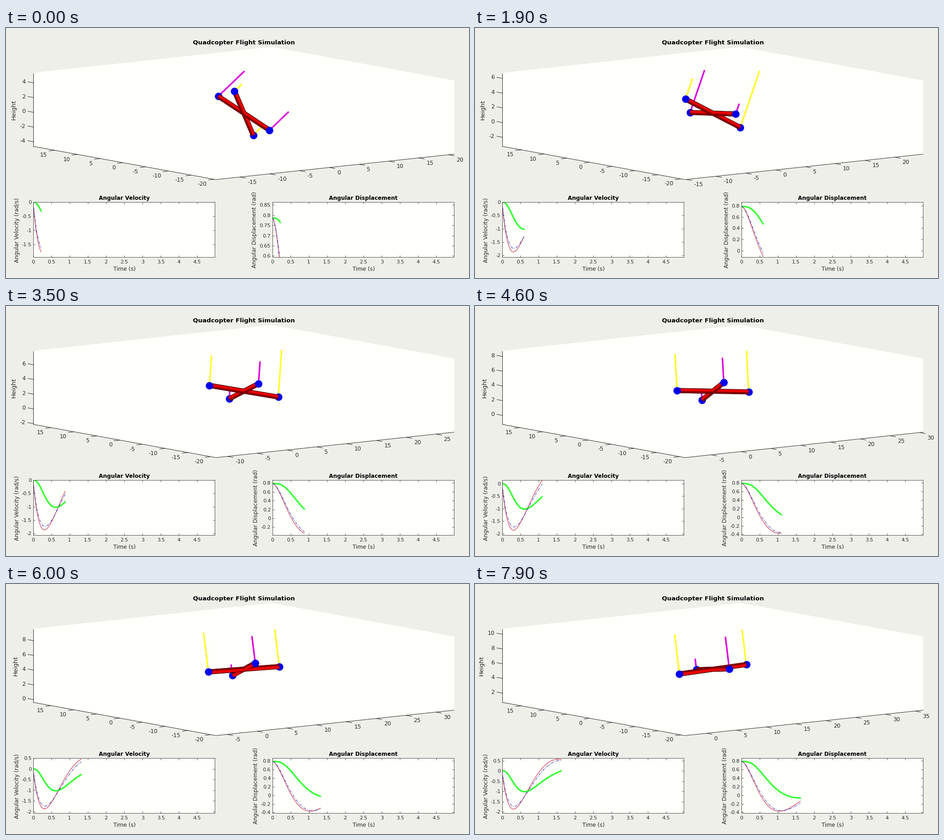
A matplotlib script for the animation above (8000 ms loop, 1018 by 550 pixels).

```python
import math
import numpy as np
import matplotlib.pyplot as plt
from matplotlib.animation import FuncAnimation

W, H, DPI = 1018, 550, 64
PX = 72 / DPI                      # points per pixel
BACK, PAPER, INK = "#efefea", "#fffffb", "#262626"
RED, BLUE, MAGENTA, YELLOW = "#e80000", "#0000ea", "#dc00dc", "#ffff22"
STEP = 0.02                        # simulated seconds per tick
FRAMES = 80

plt.rcParams.update({"font.family": "DejaVu Sans", "axes.unicode_minus": False})


# --- flight model ---
def pulse(t, peak, power):
    """Rises from 0 to 1 at the peak, then dies away."""
    tau = t / peak
    return tau ** power * np.exp(power * (1 - tau))


def angular_velocity(t):
    rebound = np.sin(math.pi / 2 * np.clip(t - .2, 0, None) / 1.16) ** 2
    roll = -1.89 * pulse(t, .33, 1) + .84 * rebound
    pitch = -1.02 * pulse(t, .62, 3) + .14 * np.clip(t - .62, 0, None) ** 2
    yaw = roll + .15 * np.sin(math.pi * (t / .6) ** .65)
    return np.array([roll, pitch, yaw])


def integrate(rate):
    total = np.cumsum((rate[:, 1:] + rate[:, :-1]) / 2 * STEP, axis=1)
    return math.pi / 4 + np.pad(total, ((0, 0), (1, 0)))


TIME = np.arange(82) * STEP
OMEGA = angular_velocity(TIME)
THETA = integrate(OMEGA)


def tick_at(frame):
    """Simulation tick on show; the playback speed varies a little."""
    return round(float(np.interp(frame, [0, 19, 35, 46, 79],
                                 [11, 30, 44, 55, 81])))


def position(t):
    return (10.3 * t * (1 - math.exp(-t / .4)),
            -1.15 * math.sin(math.pi * t / 2.2),
            3.58 * t * (1 - math.exp(-t / .35)))


def rotation(roll, pitch, yaw):
    """Columns are the body axes in world coordinates (Rz Ry Rx)."""
    (cr, cp, cy), (sr, sp, sy) = np.cos([roll, pitch, yaw]), np.sin([roll, pitch, yaw])
    rx = np.array([[1, 0, 0], [0, cr, -sr], [0, sr, cr]])
    ry = np.array([[cp, 0, sp], [0, 1, 0], [-sp, 0, cp]])
    rz = np.array([[cy, -sy, 0], [sy, cy, 0], [0, 0, 1]])
    return rz @ ry @ rx


def thrusts(t):
    """Thrust at the +y, -y, -x and +x rotors; idle is 1.5, full is 9."""
    idle, full = 1.5, 9
    braking = t > .7
    return (idle if braking else full,
            1.6 + 1.7 * t if braking else max(idle, 3.73 - 14 * (t - .22)),
            1.45 + 4.1 * (t - .22),
            full if t > .23 else idle)


# --- projection: screen pixels per world unit ---
CORNER = np.array([461, 333.])
MID = np.array([522.5, 187.])
AX = np.array([524, -56]) / 40
AY = np.array([-401, -73]) / 40
AZ = np.array([0, -16.2])


def project(p):
    return MID + p[0] * AX + p[1] * AY + p[2] * AZ


# --- static stage ---
fig = plt.figure(figsize=(W / DPI, H / DPI), dpi=DPI, facecolor=BACK)
stage = fig.add_axes([0, 0, 1, 1])
stage.set(xlim=(-.5, W - .5), ylim=(H - .5, -.5))
stage.axis("off")
live = []


def text(x, y, s, size, color=INK, **kw):
    """Text whose capitals are centred on y."""
    return stage.text(x, y + .365 * size, s, fontsize=size * PX, color=color,
                      va="baseline", **kw)


def side_text(x, y, s, size):
    return stage.text(x, y, s, fontsize=size * PX, color=INK, rotation=90,
                      ha="center", va="center")


def line(p, q, color, width, z=2):
    return stage.plot([p[0], q[0]], [p[1], q[1]], color=color, lw=width * PX,
                      solid_capstyle="butt", zorder=z)[0]


def text_width(s, size):
    return size * sum({"-": .361, ".": .318}.get(c, .636) for c in s)


def multiples(lo, hi, step):
    first, last = math.ceil(lo / step - 1e-9), math.floor(hi / step + 1e-9)
    return [round(k * step, 4) for k in range(first, last + 1)]


def make_plot(left, title):
    ax = fig.add_axes([left / W, 1 - 503.5 / H, 399.5 / W, 120.5 / H],
                      facecolor=PAPER)
    ax.set_xlim(0, 4.98)
    ticks = multiples(0, 4.5, .5)
    ax.set_xticks(ticks, [f"{v:g}" for v in ticks])
    ax.tick_params(direction="in", top=True, right=True, length=4 * PX,
                   width=.8 * PX, color=INK, labelcolor=INK,
                   labelsize=11 * PX)
    ax.tick_params(axis="x", pad=6.5 * PX)
    ax.tick_params(axis="y", pad=3.5 * PX)
    for s in ax.spines.values():
        s.set(color=INK, linewidth=.8 * PX)
    text(left + 200, 373, title, 12.1, "black", ha="center", weight="bold")
    text(left + 200.5, 529, "Time (s)", 12.1, ha="center")
    curves = [
        ax.plot([], [], color="#c0102f", lw=PX)[0],
        ax.plot([], [], color="#2cff2c", lw=3.2 * PX, solid_capstyle="round")[0],
        ax.plot([], [], color="#1c1cb4", lw=PX, ls=(0, (6, 2.5, 1.5, 2.5)))[0],
    ]
    return ax, curves


vel_ax, vel_curves = make_plot(59.5, "Angular Velocity")
pos_ax, pos_curves = make_plot(585.5, "Angular Displacement")
side_text(24, 444, "Angular Velocity (rad/s)", 12.1)
pos_label = side_text(546, 443, "Angular Displacement (rad)", 12.1)

stage.fill([60, 583, 985, 985, 461, 60], [98, 41, 115, 277, 333, 260],
           color=PAPER, lw=0, zorder=0)
for a, b in (((60, 98), (60, 260)), ((60, 260), CORNER), (CORNER, (985, 277))):
    line(a, b, INK, 1)
text(522.5, 30.5, "Quadcopter Flight Simulation", 13.45, "black",
     ha="center", weight="bold")
height_label = side_text(17, 179, "Height", 13.4)


# --- moving parts ---
def update_plot(ax, curves, data, n):
    part = data[:, :n + 1]
    lo, hi = 1.1 * part.min(), 1.1 * part.max()
    step = next(s for s in (.05, .1, .2, .5, 1) if (hi - lo) / s <= 7)
    ticks = multiples(lo, hi, step)
    names = [f"{v:g}" for v in ticks]
    ax.set_yticks(ticks, names)
    ax.set_ylim(lo, hi)
    for curve, row in zip(curves, part):
        curve.set_data(TIME[:n + 1], row)
    return max(text_width(s, 11) for s in names)


def tick(start, direction):
    unit = direction / np.hypot(*direction)
    live.append(line(start, start + 13 * unit, INK, 1))


def draw_scales(x, y, z):
    for v in multiples(x - 20, x + 20, 5):
        p = CORNER + AX * (v - x + 20)
        tick(p, -AY)
        live.append(text(p[0] + 17, p[1] + 10.7, f"{v:g}", 12.2, ha="left"))
    for v in multiples(y - 20, y + 20, 5):
        p = CORNER + AY * (v - y + 20)
        tick(p, -AX)
        live.append(text(p[0] - 16.5, p[1] + 10, f"{v:g}", 12.2, ha="right"))
    widest = 0
    for v in multiples(z - 5, z + 5, 2):
        p = np.array([60, 260]) + AZ * (v - z + 5)
        tick(p, AY)
        live.append(text(42.5, p[1] - 2.8, f"{v:g}", 12.2, ha="right"))
        widest = max(widest, text_width(f"{v:g}", 12.2))
    height_label.set_x(29 - widest)


def draw_arm(p, q, shade, z):
    d = (q - p) / np.hypot(*(q - p))
    down = np.array([-d[1], d[0]])
    if down[1] < 0:
        down = -down
    off = down * shade
    rim = down * math.copysign(abs(shade) - 1.5, shade)
    live.append(line(p, q, "#240000", 11, z))
    live.append(line(p, q, RED, 9.2, z + .01))
    live.append(line(p + off, q + off, "#900000", 2.4, z + .02))
    live.append(line(p + rim, q + rim, "#380000", 1, z + .03))


def draw_rotor(end, up, thrust, color, far):
    top = min(thrust, (5 - end[2]) / up[2])      # cut at the top of the box
    p = project(end)
    live.append(line(p, project(end + up * top), color, 3.4, 3))
    live.extend(stage.plot(*p, "o", ms=16.4 * PX, color=BLUE, mew=0,
                           zorder=4 if far else 8))


def draw_craft(n):
    t = n * STEP
    x, y, up = rotation(*THETA[:, n]).T
    ends = [5 * y, -5 * y, -5 * x, 5 * x]
    colors = [MAGENTA, MAGENTA, YELLOW, YELLOW]
    far = [True, False, False, True]
    for args in zip(ends, thrusts(t), colors, far):
        draw_rotor(args[0], up, *args[1:])
    shade = 3.4 if t < 1.2 else -3.9             # side turned from the light
    p = [project(e) for e in ends]
    draw_arm(p[0], p[1], shade, 5)
    draw_arm(p[2], p[3], shade, 5.5)
    # the halves nearer to the viewer cover the crossing
    draw_arm(MID, p[2], shade, 6)
    draw_arm(MID, p[1], shade, 6.5)


def update(i):
    while live:
        live.pop().remove()
    n = tick_at(i)
    draw_scales(*position(n * STEP))
    draw_craft(n)
    update_plot(vel_ax, vel_curves, OMEGA, n)
    pos_label.set_x(570.5 - update_plot(pos_ax, pos_curves, THETA, n))
    return []


anim = FuncAnimation(fig, update, frames=FRAMES, interval=100,
                     init_func=lambda: update(0), repeat=True, repeat_delay=0)
plt.show()
```
